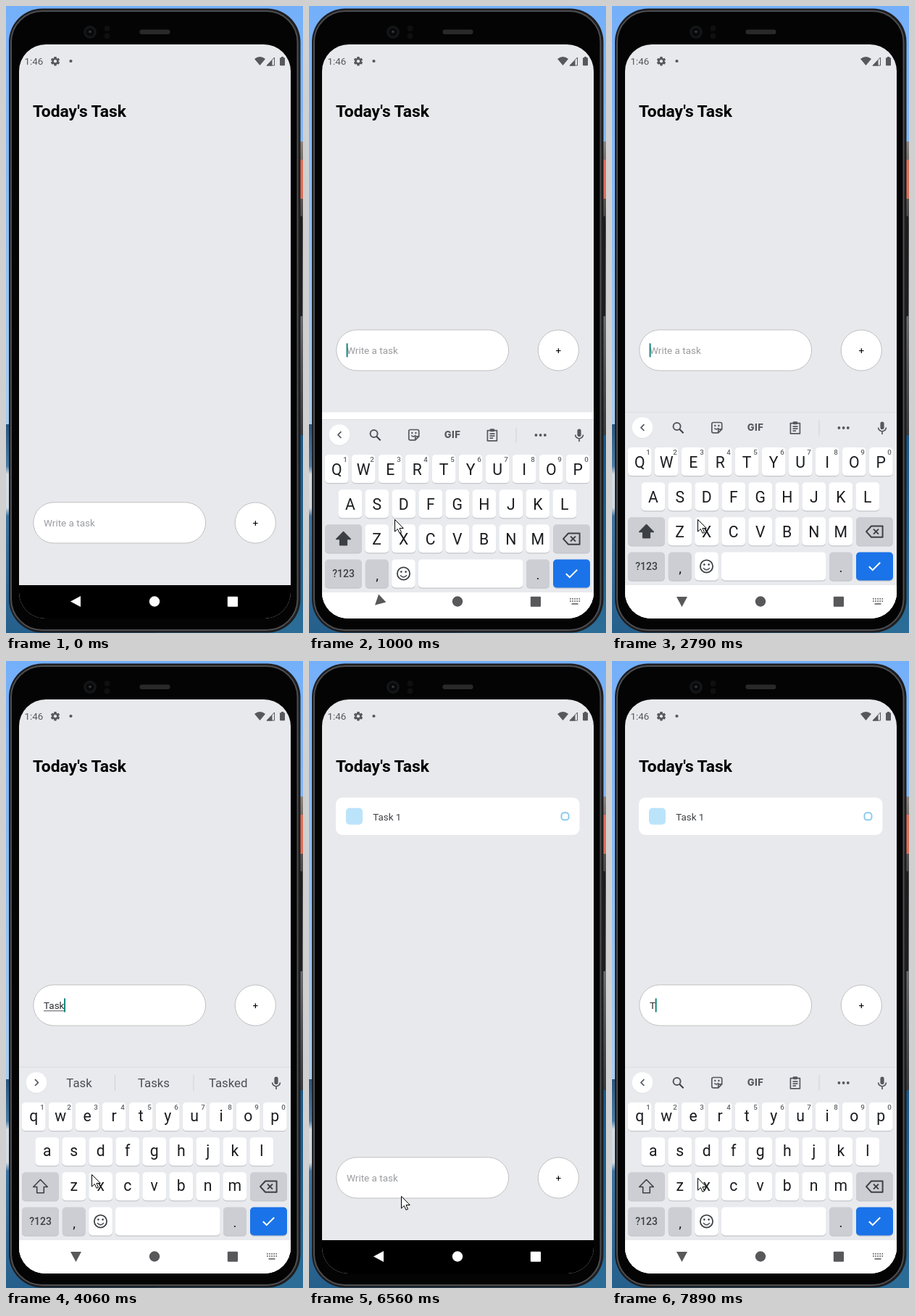
An HTML page for the animation above (8000 ms loop, 410 by 865 pixels).

```html
<!DOCTYPE html>
<html lang="en">
<head>
<meta charset="utf-8">
<title>Task list on a phone</title>
<style>
  html, body { margin: 0; width: 100%; height: 100%; overflow: hidden; background: #111; }
  svg { display: block; width: 410px; height: 865px; font-family: Roboto, "Noto Sans", sans-serif; }
  .mid { text-anchor: middle; }
  .line { fill: none; stroke: #55585d; stroke-width: 1.7; stroke-linejoin: round; }
  .bold { stroke: #3c4043; stroke-width: 2; }
  .body { font-size: 13.5px; white-space: pre; }
</style>
</head>
<body>
<svg id="stage" viewBox="0 0 410 865" xmlns="http://www.w3.org/2000/svg"></svg>
<script>
const LOOP = 8000;
const LIFT = -238;      // entry row offset while the keyboard is open
const TEXT_X = 52;

// ---------- drawing helpers ----------
const rect = (x, y, w, h, r, fill, more = '') =>
  `<rect x="${x}" y="${y}" width="${w}" height="${h}" rx="${r}" fill="${fill}" ${more}/>`;
const circle = (x, y, r, fill, more = '') =>
  `<circle cx="${x}" cy="${y}" r="${r}" fill="${fill}" ${more}/>`;
const line = (d, style = '') => `<path class="line ${style}" d="${d}"/>`;
const fillPath = (d, fill, more = '') => `<path d="${d}" fill="${fill}" ${more}/>`;
const label = (x, y, size, text, fill, more = '') =>
  `<text x="${x}" y="${y}" font-size="${size}" fill="${fill}" ${more}>${text}</text>`;
const gradient = (id, ...stops) =>
  `<linearGradient id="${id}" x2="0" y2="1">` +
  stops.map(([o, c]) => `<stop offset="${o}" stop-color="${c}"/>`).join('') + '</linearGradient>';

// ---------- scenery and phone ----------
function scenery() {
  return rect(0, 0, 410, 580, 0, 'url(#sky)') +
    rect(0, 577, 205, 288, 0, 'url(#seaL)') +
    rect(400, 187, 10, 405, 0, 'url(#rock)') +
    rect(205, 592, 205, 273, 0, 'url(#seaR)') +
    rect(404, 290, 5, 138, 1, '#1d1d1f') +
    rect(405, 212, 5, 54, 1, '#dc7059');
}

function phone() {
  return rect(4, 3.5, 402.5, 861, 46, '#1e1e20') +
    rect(7, 7, 395.5, 854, 43, '#040405', 'stroke="#4d4e51" stroke-width="2"') +
    circle(116, 36, 9, '#141517') + circle(116, 36, 5.5, '#08090b') +
    circle(116, 35.5, 1.8, '#34383c') +
    circle(139.5, 31, 4, '#0e0f10') + circle(139.5, 41.5, 4, '#0e0f10') +
    rect(184.5, 32.5, 42, 6.5, 3, '#29292a');
}

function statusBar() {
  const c = '#56585c';
  const teeth = [0, 60, 120].map(a =>
    rect(66.2, 70, 3.6, 12.4, .8, c, `transform="rotate(${a} 68 76.2)"`)).join('');
  return label(25.5, 81.3, 13.4, '1:46', c) +
    teeth + circle(68, 76.2, 4.5, c) + circle(68, 76.2, 2.1, '#e8e9ed') +
    circle(89.5, 76, 2.1, c) +
    fillPath('M343 73Q350.5 67.2 358 73L350.5 82Z', c) +
    fillPath('M360 82L370.5 71V82Z', 'none', `stroke="${c}"`) +
    fillPath('M359.5 82.4L367.5 74.2V82.4Z', c) +
    rect(378, 71.3, 7, 11, 1, c) + rect(380, 70, 3, 2, 0, c);
}

// ---------- app ----------
function app() {
  const border = 'stroke="#c0c0c0" stroke-width="1"';
  return label(37, 153.3, 22.8, "Today's Task", '#000', 'font-weight="700"') +
    '<g id="item">' +
      rect(37, 188.5, 336.5, 51.5, 9, '#fff') +
      rect(51, 202.8, 23, 23, 5, '#bbe4fb') +
      label(88.3, 219.5, 13.4, 'Task 1', '#3d3f42') +
      rect(348.5, 209.3, 10, 10, 3.6, 'none', 'stroke="#8ccaee" stroke-width="2"') +
    '</g><g id="entry">' +
      rect(37.8, 684.8, 237.8, 56.2, 28.1, '#fff', border) +
      `<text id="typed" class="body" x="${TEXT_X}" y="718"></text>` +
      rect(TEXT_X, 720.2, 0, 1, 0, '#55575a', 'id="underline"') +
      rect(0, 703.4, 2, 19, 0, '#13857a', 'id="caret"') +
      '<g id="plus">' + circle(344.3, 713, 28.1, '#fff', border) +
      label(344.3, 718, 13.5, '+', '#000', 'class="mid"') + '</g>' +
    '</g>';
}

// ---------- keyboard ----------
const ROWS = [['qwertyuiop', 38.2, 628.5], ['asdfghjkl', 56.8, 676.7], ['zxcvbnm', 93.7, 724.7]];
const PITCH = 37;
const INK = '#1b1c1f';
const ICON = '#55585d';

const key = (x, y, w, fill = '#fff') =>
  rect(x, y + 1, w, 39.2, 5, '#c3c5ca') + rect(x, y, w, 39, 5, fill);

function letters(upper) {
  return ROWS.map(([row, x, y]) => [...row].map((ch, i) =>
    label(x + i * PITCH, y + (upper ? 8.1 : 6.6), 21.2,
      upper ? ch.toUpperCase() : ch, INK, 'class="mid"')).join('')).join('') +
    fillPath('M47.5 715.5l9.8 10h-5v8.2h-9.6v-8.2h-5z', upper ? '#3c4043' : 'none',
      'stroke="#3c4043" stroke-width="1.6" stroke-linejoin="round"');
}

function keys() {
  const grey = '#cdced4';
  let out = '';
  ROWS.forEach(([row, x, y]) => [...row].forEach((_, i) =>
    out += key(x + i * PITCH - 16.4, y - 19.4, 32.8)));
  for (let i = 0; i < 10; i++)
    out += label(ROWS[0][1] + i * PITCH + 11.8, 619, 9.8, (i + 1) % 10, '#5f6267', 'class="mid" font-weight="500"');
  out += key(22, 705.3, 51, grey) + key(337, 705.3, 51, grey) +
    key(22, 753.5, 51, grey) + key(77.8, 753.5, 32, grey) + key(114.2, 753.5, 32.6) +
    key(151, 753.5, 144.5) + key(300, 753.5, 32, grey) + key(337, 753.5, 51, '#1a73e8');
  out += line('M358 717.5h15.6v15.2h-15.6l-7-7.6z', 'bold') + line('M361 721.6l7 7m0-7l-7 7', 'bold') +
    label(47.5, 778.4, 14, '?123', '#3c4043', 'class="mid" font-weight="500"') +
    label(94, 781.5, 19, ',', INK, 'class="mid"') + label(316, 781, 19, '.', INK, 'class="mid"') +
    circle(130.5, 773, 8.6, 'none', 'stroke="#3c4043" stroke-width="1.8"') +
    circle(127.4, 770.6, 1.3, '#3c4043') + circle(133.6, 770.6, 1.3, '#3c4043') +
    line('M126 775.3q4.5 5.2 9 0') +
    fillPath('M354.8 773.2l5 5 10.4-10.4', 'none', 'stroke="#fff" stroke-width="2"');
  return out;
}

function tools() {
  return line('M44.4 577.2l-4.4 4.4 4.4 4.4') +
    circle(89.6, 580, 5, 'none', `stroke="${ICON}" stroke-width="2"`) +
    line('M93.2 583.7l5.4 5.6', 'bold') +
    line('M140 574.5h9.5q2.2 0 2.2 2.2v7.2l-5 5h-6.7q-2.2 0-2.2-2.2v-10q0-2.2 2.2-2.2zM151.7 583.8h-3q-2 0-2 2v3') +
    circle(142.3, 579, 1.2, ICON) + circle(147.4, 579, 1.2, ICON) + line('M141.3 582.5q3.2 3 6-.6') +
    label(198, 586.4, 13, 'GIF', ICON, 'class="mid" font-weight="800" letter-spacing=".4" style="font-family:Inter,Roboto,sans-serif"') +
    line('M246.4 575.6h13v14.2h-13zM249.5 580.2h7M249.5 583.2h7M249.5 586.2h4.6') +
    rect(249.6, 573.2, 6.6, 4, 1.4, ICON) +
    rect(285.5, 571.5, 1, 21, 0, '#cfd1d5') +
    [313.4, 319.6, 325.8].map(x => circle(x, 582, 1.9, ICON)).join('');
}

function suggestions() {
  return line('M40 577.2l4.4 4.4-4.4 4.4') +
    [101, 204, 306.7].map(x => label(x, 588.2, 16.8, '', '#4a4d52', 'class="mid word"')).join('') +
    [150, 258.5].map(x => rect(x, 571, 1, 22, 0, '#cfd1d5')).join('');
}

function keyboard() {
  return rect(18, 560, 375, 240, 0, '#e8eaee') + rect(18, 560, 375, 1, 0, '#dcdee2') +
    rect(18, 799, 375, 260, 0, '#fff') +
    circle(42, 582.2, 14.6, '#d9dade') + circle(42, 581.6, 14.4, '#fff') +
    rect(370.4, 573.4, 5.2, 10.6, 2.6, ICON) +
    line('M367.6 581.4a5.4 5.4 0 0 0 10.8 0M373 587v4') +
    `<g id="tools">${tools()}</g><g id="words">${suggestions()}</g>` +
    keys() + `<g id="upper">${letters(true)}</g><g id="lower">${letters(false)}</g>`;
}

function navBar() {
  let dots = '';
  for (let i = 0; i < 10; i++)
    dots += rect(360 + (i % 5) * 3.1, 817 + (i > 4 ? 3.2 : 0), 1.7, 1.7, 0, '#6a6a6c');
  return '<g id="nav">' +
    fillPath('M-7.5 0L6.5-7.5V7.5Z', 'inherit', 'id="back"') +
    '<circle cx="205" cy="821.5" r="7.2"/><rect x="305.8" y="814.8" width="14.2" height="14" rx="1"/></g>' +
    `<g id="switcher">${dots}${rect(362.5, 824, 9, 1.7, 0, '#6a6a6c')}</g>`;
}

document.getElementById('stage').innerHTML =
  '<defs><clipPath id="screen"><path d="M18 90a37 37 0 0 1 37-37H356a37 37 0 0 1 37 37V809a36 36 0 0 1-36 36H54a36 36 0 0 1-36-36Z"/></clipPath>' +
  gradient('sky', [0, '#74affa'], [.5, '#8abdf5'], [1, '#a9cdf0']) +
  gradient('seaL', [0, '#2a5680'], [.2, '#4b7ca6'], [.24, '#d5dde4'], [.4, '#cfd9e2'], [.44, '#3d729f'], [1, '#255f8c']) +
  gradient('rock', [0, '#8d857f'], [.1, '#6d6662'], [.3, '#474445'], [.6, '#6b6c6e'], [.8, '#505155'], [1, '#3a3c40']) +
  gradient('seaR', [0, '#1c5a88'], [.5, '#20638f'], [1, '#2c6d97']) + '</defs>' +
  scenery() + phone() +
  '<g clip-path="url(#screen)">' + rect(18, 53, 375, 792, 0, '#e8e9ed') +
  statusBar() + app() +
  rect(18, 560.5, 375, 285, 0, '#fff', 'id="gap"') +
  rect(18, 799, 375, 47, 0, '#000', 'id="navBack"') +
  `<g id="keyboard">${keyboard()}</g>` + navBar() + '</g>' +
  '<path id="cursor" d="M0 0V16.6L3.9 13 6.5 18.8 9 17.7 6.5 12H11.8Z" fill="#fff" stroke="#000"/>';

// ---------- timeline ----------
const parts = {};
document.querySelectorAll('[id]').forEach(n => parts[n.id] = n);
const words = [...document.querySelectorAll('.word')];

// Rows spaced evenly from start to end.
const spread = (start, end, rows) =>
  rows.map((r, i) => [start + i * (end - start) / (rows.length - 1), ...r]);

// Cursor positions in n held steps along a slightly eased straight path.
const glide = (start, end, n, [x0, y0], [x1, y1]) =>
  spread(start, end, Array.from({ length: n }, (_, i) => {
    const u = (i + 1) / n, k = u * u * (3 - 2 * u);
    return [x0 + (x1 - x0) * k, y0 + (y1 - y0) * k];
  }));

const REST = [118.5, 708.5], PLUS = [342.5, 468.5], LOW = [127.5, 738.5];
const CURSOR = [
  [0, -50, -50],
  ...glide(130, 450, 5, [165, 806], [119.5, 709.5]),
  [590, 120.5, 693.5], [680, ...REST],
  ...glide(5090, 5710, 9, REST, PLUS),
  ...glide(5940, 6560, 9, PLUS, LOW),
  [6640, 118.5, 713.5]
];

// [time, keyboard offset (null = closed), back arrow angle]
const OPENING = [[170, 5], [45, 22], [10, 43], [3, 68], [0, 84], [0, 90]];
const BOARD = [
  [0, null, 0],
  ...spread(830, 1230, OPENING),
  ...spread(5940, 6330, [[0, 90], [32, 75], [115, 52], [null, 27], [null, 9], [null, 0]]),
  ...spread(6810, 7270, [...OPENING, [0, 90]])
];

// [time, text, underlined letters, lower case, suggestions]
const TYPING = [
  [0, '', 0, false, null],
  [2090, 'T', 0, true, null],
  [2320, 'T', 1, true, 'T The This'],
  [2700, '', 0, true, null],
  [2790, '', 0, false, null],
  [3250, 'T', 0, false, null],
  [3340, 'T', 0, true, null],
  [3490, 'Ta', 1, true, 'Ta Take Taking'],
  [3660, 'Tas', 2, true, 'Tas Task Tasty'],
  [3810, 'Task', 3, true, 'Task Tasks Tasty'],
  [4060, 'Task', 4, true, 'Task Tasks Tasked'],
  [4210, 'Task ', 4, true, 'Task Tasks Tasked'],
  [4360, 'Task ', 0, true, 'Task Tasks Tasked'],
  [4440, 'Task ', 0, true, 'is for and'],
  [4590, 'Task 1', 0, true, 'is for and'],
  [4840, 'Task 1', 0, true, null],
  [5940, '', 0, false, null],
  [7810, 'T', 0, false, null],
  [7890, 'T', 0, true, null]
];
const CARET = [[0, 0], [590, 1], [1690, 0], [2090, 1], [5090, 0], [5590, 1], [6018, 0], [6810, 1], [7430, 0], [7810, 1]];
const PRESS = [[0, 1], [5790, .6], [5860, .25], [5940, .5], [6018, 1]];

const at = (table, t) => table.findLast(row => row[0] <= t);
const show = (node, on) => node.setAttribute('display', on ? 'inline' : 'none');
const move = (node, x, y, angle = 0) =>
  node.setAttribute('transform', `translate(${x} ${y}) rotate(${angle})`);

const pen = document.createElement('canvas').getContext('2d');
function width(text) {
  pen.font = '13.5px Roboto, "Noto Sans", sans-serif';
  return pen.measureText(text).width;
}

function render(t) {
  const [, offset, angle] = at(BOARD, t);
  const [, text, marked, lower, hints] = at(TYPING, t);
  const open = offset !== null;
  const lifted = open && !(t >= 6018 && t < 6810);
  const p = parts;

  move(p.cursor, ...at(CURSOR, t).slice(1));
  move(p.entry, 0, lifted ? LIFT : 0);
  move(p.keyboard, 0, offset || 0);
  move(p.back, 96.5, 821.5, -angle);
  [p.keyboard, p.gap, p.switcher].forEach(n => show(n, open));
  show(p.navBack, !open);
  p.nav.setAttribute('fill', open ? '#58585a' : '#fff');
  show(p.item, t >= 5940);
  p.plus.setAttribute('opacity', at(PRESS, t)[1]);

  p.typed.textContent = text || 'Write a task';
  p.typed.setAttribute('fill', text ? '#2b2d30' : '#9b9c9f');
  p.underline.setAttribute('width', width(text.slice(0, marked)));
  p.caret.setAttribute('x', TEXT_X - .4 + width(text));
  show(p.caret, at(CARET, t)[1]);

  show(p.upper, !lower);
  show(p.lower, lower);
  show(p.tools, !hints);
  show(p.words, hints);
  if (hints) hints.split(' ').forEach((w, i) => words[i].textContent = w);
}

const start = performance.now();
function tick(now) {
  // A few ms of slack keeps step edges on time.
  render((Math.max(0, now - start) + 4) % LOOP);
  requestAnimationFrame(tick);
}
render(0);
requestAnimationFrame(tick);
</script>
</body>
</html>
```
